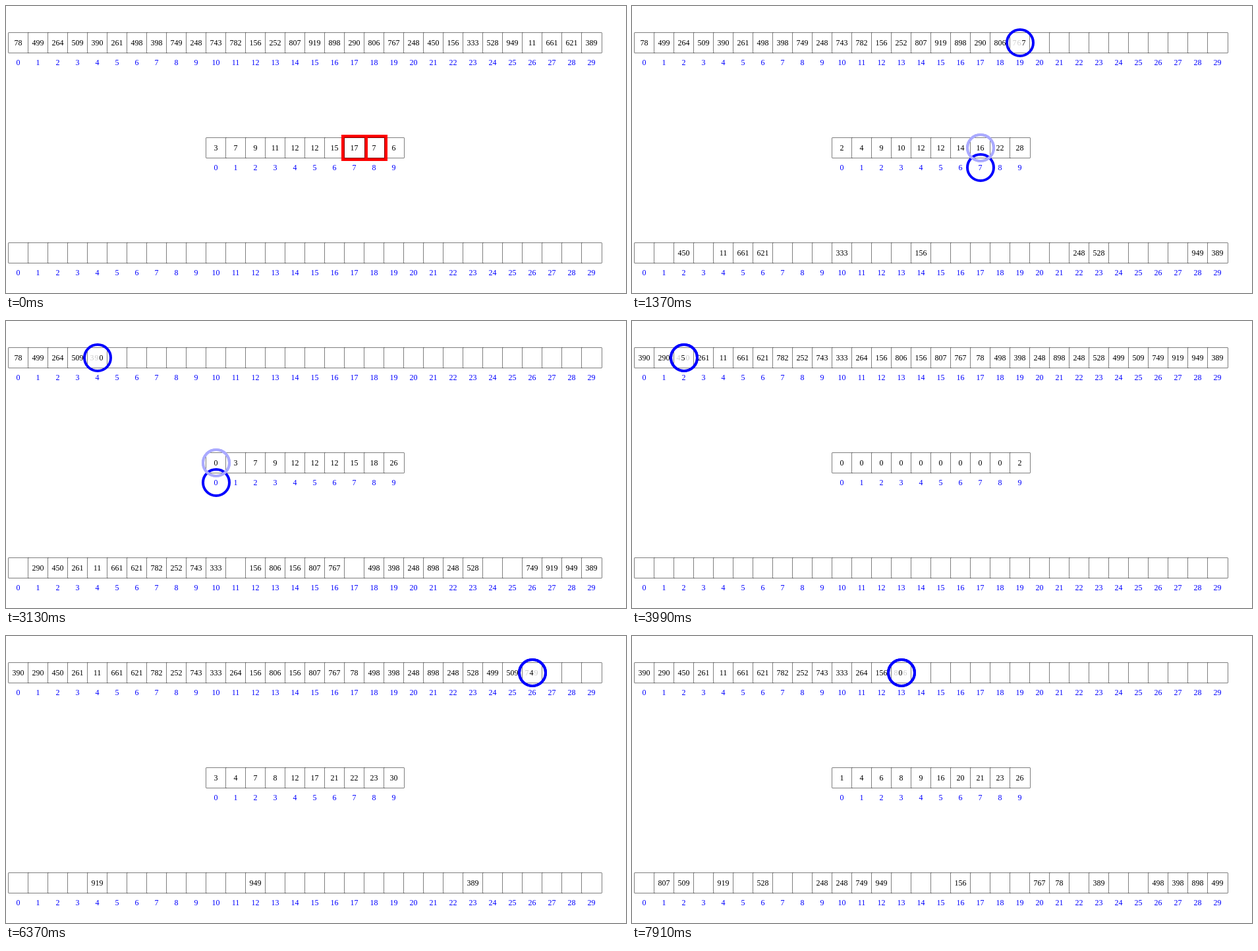
An HTML page with a canvas that plays this animation: 941x437 px, repeating every 8000 ms.

```html
<!DOCTYPE html>
<html lang="en">
<head>
<meta charset="utf-8">
<title>Radix sort</title>
<style>
  html, body { margin: 0; width: 100%; height: 100%; overflow: hidden; background: #fff; }
  canvas { display: block; }
</style>
</head>
<body>
<canvas id="stage" width="941" height="437"></canvas>
<script>
const ctx = document.getElementById('stage').getContext('2d');

const STEP_MS = 29.5;
const HOLD_MS = 140;
const KEY_TIMES = [0, 1370, 2320, 3130, 5010, 6370, 7910, 8000];
const LOOP = KEY_TIMES[KEY_TIMES.length - 1];
const CELL = 30;
const BLUE = '#0000ff', PALE = '#aaaaff', RED = '#ff0000';
const ROWS = {
  input: { x: 19, y: 56, size: 30 },
  count: { x: 319, y: 216, size: 10 },
  output: { x: 19, y: 376, size: 30 }
};
// The list being sorted
const VALUES = ('78 499 264 509 390 261 498 398 749 248 743 782 156 252 807 ' +
  '919 898 290 806 767 248 450 156 333 528 949 11 661 621 389').split(' ').map(Number);

const digitOf = (value, place) => Math.floor(value / 10 ** place) % 10;

// Runs the sort and records the state after every step.
function recordSteps() {
  const steps = [];
  let input = [...VALUES];
  const count = Array(10).fill(0);
  let output = Array(30).fill('');
  const snap = (extra = {}) =>
    steps.push({ input: [...input], count: [...count], output: [...output], rings: [], ...extra });
  const ring = (row, i, color, label) => ({ row: ROWS[row], i, color, label });

  for (let place = 0; place < 2; place++) {
    count.fill(0);
    snap();

    for (let i = 0; i < 30; i++) {
      const d = digitOf(input[i], place);
      const split = { i, place };
      const source = ring('input', i, BLUE);
      snap({ split, rings: [source, source] });
      count[d]++;
      snap({ split, rings: [source, ring('count', d, BLUE, true)] });
    }

    for (let i = 1; i < 10; i++) {
      snap({ place, lit: i });
      count[i] += count[i - 1];
      snap({ place, lit: i });
    }

    // Each ring starts out doubled, then its copy jumps to the next spot.
    for (let i = 29; i >= 0; i--) {
      const value = input[i];
      const d = digitOf(value, place);
      const split = { i, place };
      const source = ring('input', i, BLUE);
      const counter = ring('count', d, PALE);
      snap({ split, rings: [source, source] });
      const slot = --count[d];
      const found = [source, ring('count', d, BLUE, true)];
      snap({ split, rings: found });
      snap({ split, rings: [...found, counter, counter] });
      snap({ rings: [...found, counter, ring('output', slot, PALE, true)] });
      input[i] = '';
      output[slot] = value;
    }

    snap();
    input = output;
    output = Array(30).fill('');
  }
  return steps;
}

function drawText(text, x, y, color) {
  ctx.fillStyle = color;
  ctx.fillText(text, x - 0.5, y + 4);
}

// The fill hides the inner half of the outline.
function drawCell(row, i, value, lit) {
  const x = row.x + i * CELL, left = x - CELL / 2, top = row.y - CELL / 2;
  if (lit) {
    ctx.fillStyle = RED;
    ctx.fillRect(left - 5, top - 5, CELL + 10, CELL + 10);
  }
  ctx.lineWidth = 1;
  ctx.strokeStyle = '#000';
  ctx.strokeRect(left, top, CELL, CELL);
  ctx.fillStyle = '#fff';
  ctx.fillRect(left, top, CELL, CELL);
  drawText(value, x, row.y, '#000');
}

function drawSplit(value, i, place) {
  for (let k = 0; k < 3; k++) {
    ctx.globalAlpha = k === place ? 1 : 0.2;
    drawText(digitOf(value, k), ROWS.input.x + i * CELL + 6 - 7 * k, ROWS.input.y, '#000');
  }
  ctx.globalAlpha = 1;
}

function drawRing({ row, i, color, label }) {
  ctx.strokeStyle = color;
  ctx.lineWidth = 4;
  ctx.beginPath();
  ctx.arc(row.x + i * CELL, row.y + (label ? 30 : 0), 20, 0, Math.PI * 2);
  ctx.stroke();
}

function draw(state) {
  const { split, lit } = state;
  ctx.fillStyle = '#fff';
  ctx.fillRect(0, 0, 941, 437);
  ctx.font = '12px "Liberation Serif", serif';
  ctx.textAlign = 'center';

  for (const name in ROWS) {
    const row = ROWS[name];
    for (let i = 0; i < row.size; i++) {
      const hidden = name === 'input' && split && split.i === i;
      drawCell(row, i, hidden ? '' : state[name][i]);
      drawText(i, row.x + i * CELL, row.y + 30, BLUE);
    }
  }
  if (lit) {
    for (const i of [lit, lit - 1]) drawCell(ROWS.count, i, state.count[i], true);
  }
  if (split) drawSplit(state.input[split.i], split.i, split.place);
  state.rings.forEach(drawRing);
}

// Start of the picture on show: each key span is shared by evenly held pictures.
function heldTime(t) {
  const k = KEY_TIMES.findIndex(key => key > t);
  const start = KEY_TIMES[k - 1], span = KEY_TIMES[k] - start;
  const hold = span / Math.round(span / HOLD_MS);
  return start + Math.floor((t - start) / hold) * hold;
}

const steps = recordSteps();
const firstStep = steps.findIndex(s => s.place === 0 && s.lit === 8);
const origin = performance.now();
let shown = -1;

function tick() {
  const t = heldTime((performance.now() - origin) % LOOP);
  const step = firstStep + Math.floor(t / STEP_MS + 0.1);
  if (step !== shown) {
    draw(steps[step]);
    shown = step;
  }
  requestAnimationFrame(tick);
}
tick();
</script>
</body>
</html>
```
